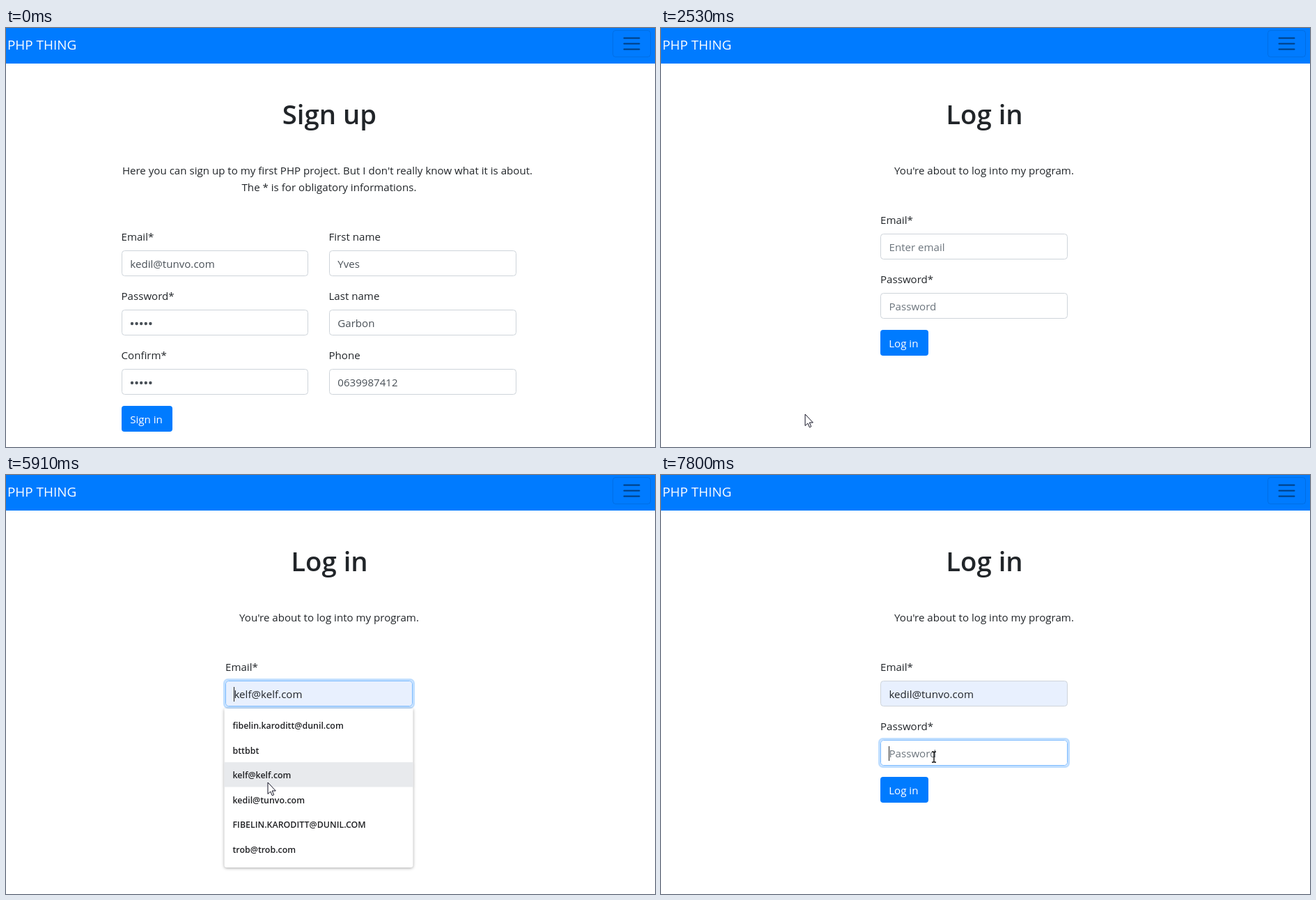
An HTML page for the animation above (8 s loop, 932 by 601 pixels).

```html
<!DOCTYPE html>
<html lang="en">
<head>
<meta charset="utf-8">
<title>Sign up and log in</title>
<style>
html, body { margin: 0; width: 100%; height: 100%; overflow: hidden; background: #fff; }
svg { display: block; font: 15.1px "Open Sans", "Noto Sans", sans-serif; }
.title { font-size: 38.3px; font-weight: 600; }
.mid { text-anchor: middle; }
.row { font-size: 12.4px; font-weight: 600; }
#menu { filter: drop-shadow(0 1px 2px rgba(0,0,0,.35)); }
</style>
</head>
<body>
<svg id="stage" width="932" height="601" viewBox="0 0 932 601"></svg>
<script>
const DARK = '#212529', VALUE = '#495057', HINT = '#6c757d';
const BLUE = [0, 123, 255], HOVER = [0, 105, 217], ACTIVE = [0, 98, 204];
const BORDER = [206, 212, 218], FOCUS = [128, 189, 255];
const LOOP = 8000, ROW = 35.5, MENU_TOP = 341, HIGH = 37;
const accounts = ['fibelin.karoditt@dunil.com', 'bttbbt', 'kelf@kelf.com',
  'kedil@tunvo.com', 'FIBELIN.KARODITT@DUNIL.COM', 'trob@trob.com'];
const chosen = accounts[3];

// Markup helpers
const text = (x, y, s, fill = DARK, attrs = '') =>
  `<text x="${x}" y="${y}" fill="${fill}" ${attrs}>${s}</text>`;
const box = (x, y, w, h, attrs) =>
  `<rect x="${x}" y="${y}" width="${w}" height="${h}" ${attrs}/>`;
const input = (x, y, w, id = '') =>
  box(x + .5, y + .5, w - 1, HIGH - 1, `rx="4" fill="#fff" stroke="#ced4da" ${id && `id="${id}"`}`);
const ring = (id, x, y, w) =>
  box(x - 1.5, y - 1.5, w + 3, HIGH + 3,
    `id="${id}" rx="5" fill="none" stroke="#007bff" stroke-opacity=".25" stroke-width="3"`);
const button = (id, x, y, w, label) =>
  box(x, y, w, HIGH, `id="${id}" rx="4"`) + text(x + 12.2, y + 24.5, label, '#fff');
const field = (x, y, w, label, value) =>
  text(x - .5, y - 14, label) + input(x, y, w) + text(x + 12.3, y + 25, value, VALUE);
const dots = y => [0, 1, 2, 3, 4].map(i =>
  `<circle cx="${181 + i * 6.6}" cy="${y}" r="2.2" fill="${VALUE}"/>`).join('');

stage.innerHTML =
  box(0, 0, 932, 51, 'fill="#007bff"') +
  text(2, 30.5, 'PHP THING', '#fff', 'font-size="18.9"') +
  box(871.5, 3.5, 54, 38, 'rx="4" fill="none" stroke="#000" stroke-opacity=".1"') +
  '<path d="M887.5 14.5h22m-22 8h22m-22 8h22" stroke="#000" stroke-opacity=".5" stroke-width="2" stroke-linecap="round"/>' +
  '<g id="signup">' +
    text(464.5, 138, 'Sign up', DARK, 'class="title mid"') +
    text(461.5, 210, "Here you can sign up to my first PHP project. But I don't really know what it is about.", DARK, 'class="mid"') +
    text(464, 234, 'The * is for obligatory informations.', DARK, 'class="mid"') +
    field(166, 319, 268, 'Email*', chosen) + field(464, 319, 269, 'First name', 'Yves') +
    field(166, 404, 268, 'Password*', '') + field(464, 404, 269, 'Last name', 'Garbon') +
    field(166, 489, 268, 'Confirm*', '') + field(464, 489, 269, 'Phone', '0639987412') +
    dots(424) + dots(509) + ring('signRing', 166, 542, 73) + button('signBtn', 166, 542, 73, 'Sign in') +
  '</g><g id="login">' +
    text(464.5, 138, 'Log in', DARK, 'class="title mid"') +
    text(464, 210, "You're about to log into my program.", DARK, 'class="mid"') +
    text(315, 281, 'Email*') + ring('mailRing', 315, 295, 269) + input(315, 295, 269, 'mail') +
    text(327.5, 320, '', DARK, 'id="mailText"') +
    '<path id="wave" fill="none" stroke="#e03131"/>' +
    text(315, 366, 'Password*') + ring('passRing', 315, 380, 269) + input(315, 380, 269, 'pass') +
    text(327.5, 405, 'Password', HINT) +
    button('logBtn', 315, 433, 69, 'Log in') +
    '<g id="menu">' +
      '<path d="M313.5 335H584.5V559.5a3.5 3.5 0 0 1-3.5 3.5H317a3.5 3.5 0 0 1-3.5-3.5Z" fill="#fff"/>' +
      box(313.5, 0, 271, ROW, 'id="mark" fill="#e8eaed"') +
      accounts.map((s, i) => text(325.5, 364 + i * ROW, s, '#202124', 'class="row"')).join('') +
    '</g>' + box(327, 304, 1, 21, 'id="caret" fill="#222"') +
  '</g><g id="cursor">' +
    '<circle id="click" r="12" fill="#ffeb00" fill-opacity=".5"/>' +
    '<path id="arrow" d="M0 0V16.5L3.8 13L6.3 18.8L8.7 17.7L6.2 12H11.3Z" fill="#fff" stroke="#112" stroke-linejoin="round"/>' +
    '<path id="hand" d="M-1.5 2.5Q0 0 2 2.5V8.5Q4 7.5 5.5 9Q8 8.5 8.8 10Q11 9.8 11 12V16Q11 19 9 22H1Q-1 18-4.5 14Q-5 11-1.5 12.5Z" fill="#fff" stroke="#112" stroke-linejoin="round"/>' +
    '<path id="beam" d="M-3-7.5H-1L0-6.5L1-7.5H3M-3 7.5H-1L0 6.5L1 7.5H3M0-6.5V6.5" fill="none" stroke="#111" stroke-width="1.4"/>' +
  '</g>';

const $ = Object.fromEntries([...stage.querySelectorAll('[id]')].map(e => [e.id, e]));
const show = (id, on) => $[id].setAttribute('visibility', on ? 'inherit' : 'hidden');
const set = (id, attrs) => { for (const k in attrs) $[id].setAttribute(k, attrs[k]); };
const within = (t, ...spans) => spans.some(([a, b]) => t >= a && t < b);
const ramp = (t, a, d = 150) => Math.min(1, Math.max(0, (t - a) / d));
const mix = (a, b, k) => `rgb(${a.map((v, i) => Math.round(v + (b[i] - v) * k))})`;

// Pointer path: time, x, y
const path = [
  [520, 690, 592], [600, 652, 590], [760, 480, 584], [920, 330, 577], [1080, 245, 568],
  [1300, 206, 555], [1390, 207, 554], [3160, 207, 554], [3260, 262, 569], [3380, 370, 525],
  [3500, 436, 440], [3570, 424, 380], [3630, 391, 351], [3700, 391, 351], [3880, 401, 316],
  [5838, 401, 316], [5840, 385, 395], [5910, 376, 441], [5970, 376, 441], [6050, 377, 450],
  [6380, 377, 450], [6470, 377, 449], [6990, 377, 449], [7070, 381, 454], [7160, 389, 414.5],
  [7220, 389, 414.5], [7390, 391, 406], [7530, 392, 404.5]
];
function pointer(t) {
  const i = path.findIndex(p => p[0] > t);
  if (i < 0) return path.at(-1).slice(1);
  if (!i) return path[0].slice(1);
  const [a, x, y] = path[i - 1], [b, u, v] = path[i], k = (t - a) / (b - a);
  return [x + (u - x) * k, y + (v - y) * k];
}

function cursorKind(t, x, y, open) {
  const over = (l, top, w) => x >= l && x < l + w && y >= top && y < top + HIGH;
  if (t < 2530) return t < 2380 && over(166, 542, 73) ? 'hand' : 'arrow';
  if (over(315, 295, 269)) return 'beam';
  if (open) return 'arrow';
  if (over(315, 380, 269)) return 'beam';
  return over(315, 433, 69) ? 'hand' : 'arrow';
}

function draw(t) {
  const [x, y] = pointer(t), second = t >= 2530, open = within(t, [4350, 6690]);
  show('signup', !second);
  show('login', second);
  show('menu', second && open);

  // Pointer and click spot
  show('cursor', t >= 520);
  set('cursor', { transform: `translate(${x} ${y})` });
  const kind = cursorKind(t, x, y, open);
  for (const k of ['arrow', 'hand', 'beam']) show(k, k === kind);
  show('click', within(t, [1760, 2000], [4210, 4440], [6620, 6760], [7730, 7800]));

  // Buttons
  const pressed = within(t, [1840, 1920]);
  set('signBtn', { fill: mix(BLUE, pressed ? ACTIVE : HOVER, ramp(t, 1150)) });
  set('signRing', { opacity: ramp(t, 1800, 120) });
  set('logBtn', { fill: mix(BLUE, HOVER, ramp(t, 6690) - ramp(t, 7100)) });

  // Fields and menu
  const row = open ? Math.floor((y - MENU_TOP) / ROW) : -1;
  const picked = t >= 6690, value = picked ? chosen : accounts[row];
  show('mark', open && row >= 0);
  set('mark', { y: MENU_TOP + row * ROW });
  const passFocus = ramp(t, 7700, 100), mailFocus = ramp(t, 4240) - passFocus;
  set('mailRing', { opacity: mailFocus });
  set('mail', { stroke: mix(BORDER, FOCUS, mailFocus), fill: value ? '#e8f0fe' : '#fff' });
  set('passRing', { opacity: passFocus });
  set('pass', { stroke: mix(BORDER, FOCUS, passFocus) });
  $.mailText.textContent = value || 'Enter email';
  set('mailText', { fill: value ? DARK : HINT });

  // Spelling mark and caret
  const waved = within(t, [7000, 7730]);
  show('wave', second && waved);
  const end = second && picked ? 327.5 + $.mailText.getComputedTextLength() : 327;
  if (waved) {
    const from = t < 7530 ? 327.5 + $.mailText.getSubStringLength(0, chosen.indexOf('@') + 1) : 327.5;
    set('wave', { d: `M${from} 324.5` + 'l2-2 2 2'.repeat(Math.floor((end - from) / 4)) });
  }
  const inPass = t >= 7730;
  show('caret', second && within(t, [4240, 4770], [5300, 6380], [6690, 7220], [7730, LOOP]));
  set('caret', { x: inPass || !picked ? 327 : Math.round(end + 1), y: inPass ? 389 : 304 });
}

const start = performance.now();
(function tick() {
  draw((performance.now() - start) % LOOP);
  requestAnimationFrame(tick);
})();
</script>
</body>
</html>
```
